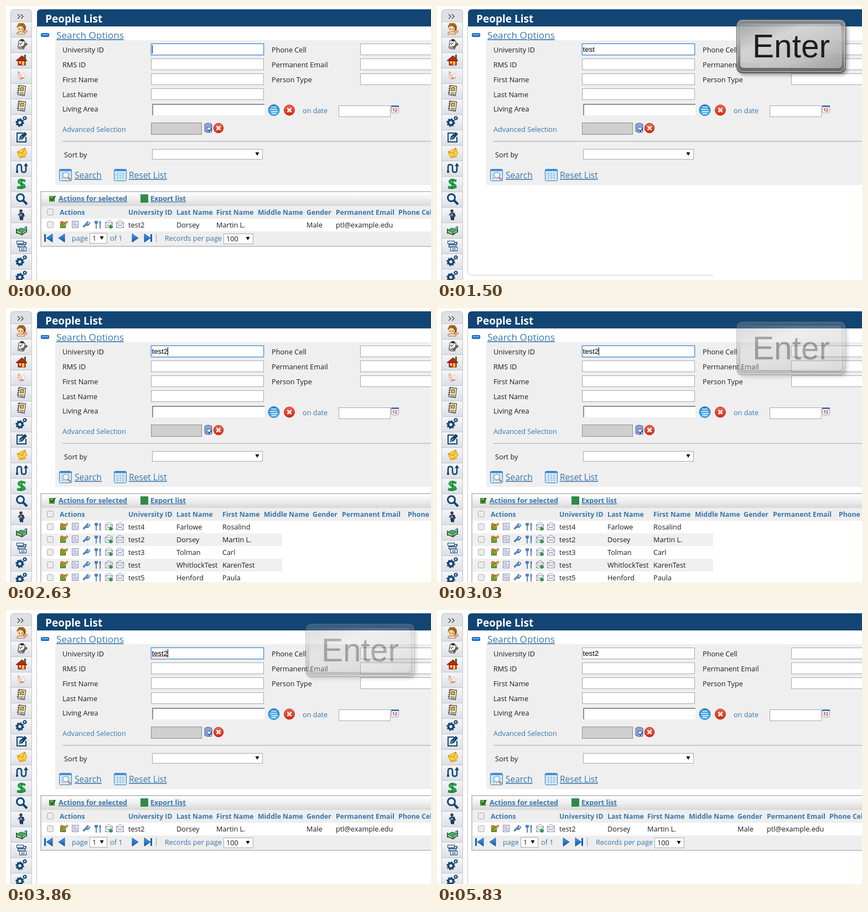
Recreate the animation shown at these times as an HTML page. Size 768x496 px, loop 5900 ms.

```html
<!DOCTYPE html>
<html lang="en">
<head>
<meta charset="utf-8">
<title>People List</title>
<style>
html, body { margin: 0; width: 100%; height: 100%; overflow: hidden; background: #fff; }
svg { display: block; width: 768px; height: 496px; }
text { font: 12.7px "Open Sans", "Noto Sans", sans-serif; fill: #1c1c1c; white-space: pre; }
.blue { fill: #3976ab; }
.bold { font-weight: 700; font-size: 12.3px; fill: #3976ab; }
.link { fill: #3976ab; text-decoration: underline; }
.tool { font-weight: 700; font-size: 12.6px; }
.big { font-size: 15.5px; }
.head { font-size: 17.2px; }
.title { font-weight: 700; font-size: 19px; fill: #fff; }
.date { font-weight: 700; font-size: 8px; fill: #d22; }
.typed { font: 13.33px "Liberation Sans", Arial, sans-serif; fill: #000; }
.cap { font: 58.6px "Liberation Sans", Arial, sans-serif; fill: #000; }
</style>
</head>
<body>
<svg id="stage" viewBox="0 0 768 496"></svg>
<script>
const LOOP = 5900, NAVY = '#124573';

const text = (x, y, s, cls = '') => `<text x="${x}" y="${y}" class="${cls}">${s}</text>`;
const box = (x, y, w, h, fill, stroke = 'none', rx = 0) => {
  const o = stroke === 'none' ? 0 : .5;
  return `<rect x="${x + o}" y="${y + o}" width="${w - 2 * o}" height="${h - 2 * o}" rx="${rx}" fill="${fill}" stroke="${stroke}"/>`;
};
const path = (d, fill = 'none', stroke = 'none', w = 1) =>
  `<path d="${d}" fill="${fill}" stroke="${stroke}" stroke-width="${w}"/>`;
const dot = (x, y, r, fill, more = '') => `<circle cx="${x}" cy="${y}" r="${r}" fill="${fill}" ${more}/>`;
const at = (x, y, s, turn = 0) => `<g transform="translate(${x} ${y}) rotate(${turn})">${s}</g>`;
const field = (x, y, w, h = 21) => box(x, y, w, h, '#fff', '#a9a9a9');
const arrow = (x, y) => path(`M${x - 3.5} ${y - 3}h7l-3.5 6z`, '#000');
const gradient = (id, stops, dir = 'x2="0" y2="1"') =>
  `<linearGradient id="${id}" ${dir}>${stops.map((c, i) =>
    `<stop offset="${i / (stops.length - 1)}" stop-color="${c}"/>`).join('')}</linearGradient>`;

const defs = `<defs>
  ${gradient('cell', ['#f6f6f8', '#e9ebee', '#dcdfe4'])}
  ${gradient('bar', ['#ffffff', '#eeeeee', '#d8d8d8'])}
  ${gradient('blueBall', ['#1f86d8', '#55b8f6'])}
  ${gradient('redBall', ['#f0664e', '#d22812'])}
  ${gradient('nav', ['#4a9ee4', '#0b55ab'])}
  ${gradient('edge', ['#8c8c8c', '#a8a8a8', '#868686', '#505050'])}
  ${gradient('face', ['#9a9a9a', '#d0d0d0', '#bebebe', '#959595'], 'x2="1" y2="1"')}
  <filter id="soft" x="-10%" y="-15%" width="125%" height="140%"><feGaussianBlur stdDeviation="3"/></filter>
</defs>`;

// Sidebar icons, each drawn around its centre
const gear = (x, y, r) =>
  dot(x, y, r, 'none', `stroke="${NAVY}" stroke-width="${r * .8}"`) +
  dot(x, y, r * 1.45, 'none', `stroke="${NAVY}" stroke-width="${r * .5}" stroke-dasharray="${r * 1.45 * Math.PI / 8}"`);
const gears = gear(-3, 1, 4.6) + gear(6, -7, 2.3);
const notes = at(0, -1, box(-6, -9, 13, 18, '#fffbe8', '#222') + box(-3, -6, 7, 7, '#e3b43c', '#54400f') +
  path('M-3 4h8M-3 6.500h8', 'none', '#333') + path('M-8 -7h4M-8 -3h4M-8 1h4M-8 5h4', 'none', '#333'), 8);
const icons = [
  dot(0, -3, 8, '#8b5a20') + dot(-2, 0, 6, '#fbd2a4') + path('M-9 -4q7 -1 9 -6q4 6 7 6l-3 -7h-9z', '#a66d25') +
    path('M-8 6q7 -3 14 0v3h-14z', '#f4e4d0', '#9b6a38') + dot(-4, 0, .9, '#333') + dot(1, 0, .9, '#333') + dot(8, 4, 3, '#e8a66a'),
  at(0, 0, box(-6, -8, 12, 16, '#fff', '#222', 2) + box(-3, -10, 6, 4, '#333') +
    path('M-4 -2l2 2 3 -4M-4 4l2 2 3 -4', 'none', '#222') + path('M1 5L8 -4l2 2-7 8z', '#b98b55', '#222'), 8),
  path('M-6 0h13v9h-13z', '#e23a22', '#5c1309') + path('M-10 1L1 -8 10 1z', '#c42412', '#5c1309') +
    path('M4 -4l1 -6h3v8z', '#2c7d2a') + box(1, 2, 4, 7, '#f2cb3c') + box(-4, 2, 3, 4, '#ffe99c'),
  path('M-6 -8q3 4 4 8t5 5l-6 2q-5 -6 -3 -15z', '#f7d9c6', '#e0a88c') + path('M2 -4q5 -2 4 4l-2 5h-4z', '#fff', '#dba') +
    path('M-2 5l7 -1', 'none', '#d55', 1.5) + dot(-4, -5, 1.2, '#dc8a62'),
  notes, notes, gears,
  path('M3 -8h-11v16h16v-9', 'none', NAVY, 2) + path('M-5 5l2 -7 9 -8 4 4 -8 9z', NAVY) + path('M-4 4l6 -6', 'none', '#fff'),
  path('M-8 -2L6 -9l4 10-13 7z', '#ffd53d', '#c78f10') + path('M-8 -2l10 3 4 -10', 'none', '#b87d0a') + path('M-8 0l5 8 11 -4v3l-11 3z', '#f0a818'),
  path('M-8 7V-3q0 -4 4 -4t4 4v6q0 4 4 4t4 -4V-4', 'none', NAVY, 2.6) + path('M4 -4h8l-4 -6z', NAVY) + dot(-8, 6, 2.2, NAVY),
  path('M7 -5q-8 -4 -11 -1t4 6 4 5-12 1', 'none', '#26a045', 4.5) + path('M1 -9L-1 9', 'none', '#147a2e', 2) + path('M-8 7q9 4 16 -2', 'none', '#147a2e', 1.5),
  dot(-2, -3, 6.5, '#eef4f9', `stroke="${NAVY}" stroke-width="3"`) + path('M3 2l7 7', 'none', NAVY, 4),
  dot(-1, -7, 2.8, '#3b3b44') + path('M-3 -4h6l1 7-2 6h-5l-1 -6z', '#1e4d91') + path('M-3 -3l-3 4M3 -3l2 6M-1 4v6M2 4v6', 'none', '#222', 1.6) + dot(-1, 0, 1.5, '#f1b984'),
  path('M-9 0l8 -4 9 3-7 6z', '#3fae55', '#17602a') + path('M-9 -3v9M1 4v5M9 -7v11M-9 4l10 4 8 -6', 'none', '#3b5c38', 2) + path('M3 -4l5 -4 1 6z', '#67a7de'),
  box(-9, -9, 13, 6, '#e8eef5', NAVY) + box(-7, -3, 14, 6, '#9fb9d3', NAVY) + box(-4, 2, 13, 8, '#f6f9fc', NAVY) + path('M-1 5h7M-1 7.500h7', 'none', NAVY) + path('M4 -6h4v4', 'none', NAVY, 1.6),
  gears, gears
];
const sidebar = path('M8.500 496V12q0 -5.500 6 -5.500h26q6 0 6 5.500V496z', '#dfe1e5', '#bdbdbd') +
  path('M21 15l4 4-4 4M27 15l4 4-4 4', 'none', '#444c56', 1.4) +
  icons.map((icon, i) => box(8, 28 + 28 * i, 39, 29, 'url(#cell)', '#c3c5c8') + at(28, 42 + 28 * i, icon)).join('');

const redCross = (x, y, r) => dot(x, y, r, 'url(#redBall)', 'stroke="#b9301c"') +
  at(x, y, path('M-3.500 -3.500l7 7M3.500 -3.500l-7 7', 'none', '#fff', 2.6));
const gridIcon = box(0, 0, 23, 22, '#dceefb', '#2f78b8', 2) + box(1, 1, 21, 3, '#3f92d8') +
  path('M2 8.500h19M2 12.500h19M2 16.500h19M6.500 5v15M11.500 5v15M16.500 5v15', 'none', '#8fbfe4');

const form = box(89, 62, 679, 262, '#efefef') +
  box(63, 49, 15, 7, '#2c83dc', '#0d4fa4', 1) + box(65, 51, 11, 1, '#8dc3f5') +
  text(91, 59, 'Search Options', 'link head') +
  ['University ID', 'RMS ID', 'First Name', 'Last Name', 'Living Area']
    .map((s, i) => text(102, [84, 111, 138, 165, 191][i], s)).join('') +
  text(102, 228, 'Advanced Selection', 'blue') + text(105, 274, 'Sort by') +
  ['Phone Cell', 'Permanent Email', 'Person Type']
    .map((s, i) => text(480, 84 + 27 * i, s) + field(640, 68 + 27 * i, 140)).join('') +
  [68, 95, 122, 149].map(y => field(262, y, 204)).join('') +
  box(264, 177, 203, 21, '#fff') + path('M265 198V178H467', 'none', '#8f8f8f', 2) +
  dot(484, 188.5, 10, 'url(#blueBall)', 'stroke="#1f76bd"') +
  path('M479 183h10M477 187h13M479 191h12M480 194.500h8', 'none', '#fff', 1.4) +
  redCross(512, 188.5, 9.5) + text(536, 194, 'on date', 'blue') + field(601, 180, 94) +
  box(696, 180, 14, 14, '#fff', '#8a97b8', 2) + box(696, 180, 14, 3, '#4d6db5') + text(698, 191, '12', 'date') +
  box(262, 211, 92, 22, '#cfcfcf', '#8c8c8c') +
  path('M359 214q6 -4 13 0v13q-6 4 -13 0z', '#8fa3cf', '#52679c') + box(363, 219, 9, 10, '#e8f0fc', '#3d5fa8') +
  path('M365 224l2.500 3 4 -6', 'none', '#2849a0', 2) + redCross(384, 221, 8.8) +
  box(102, 244, 666, 2, '#c8c8c8') + field(264, 259, 200, 19) + arrow(454, 268) +
  at(96, 295, gridIcon + dot(12, 11, 5, '#f4fafe', 'stroke="#a9b4c4" stroke-width="1.800"') + path('M16 15l5 5', 'none', '#d0704a', 2.4)) +
  at(195, 295, gridIcon) + text(124, 312, 'Search', 'link big') + text(222, 312, 'Reset List', 'link big');

// Result lists
const check = y => box(74, y, 12, 12, '#ececec', '#aaa', 2);
const envelope = x => box(x, -4, 14, 10, '#fdfdff', '#8b93ae') +
  path(`M${x} -4l7 -4 7 4M${x} 6l5 -5h4l5 5M${x} -3l7 5 7 -5`, 'none', '#8b93ae');
const actions = y => check(y - 6) + at(0, y,
  box(98, -5, 10, 11, '#5dac3a', '#2f7a1c') + dot(101, -4, 3, '#d9702b') + path('M102 3l8 -10 2 2-8 9z', '#f1b23a', '#8d5b12') +
  box(119, -7, 12, 13, '#f3f3fb', '#7b80ad') + path('M121 -3.500h6M121 -.500h8M121 2.500h8', 'none', '#7b80ad') +
  path('M139 3l5 -5 3 -4 5 3-3 4-7 1-1 3z', '#5f97d2', '#2d5c94') + dot(149, -3, 1.2, '#fff') +
  path('M163 -2v9M161 -7v4h4v-4M163 -7v4M170 -7v14', 'none', '#2b5fa3', 1.5) + path('M169 -7q4 3 1 7z', '#2b5fa3') +
  envelope(179) + path('M189.500 0v7M186 3.500h7', 'none', '#22962f', 2.6) + envelope(199));
const row = (y, cells, xs) => actions(y) + cells.map((s, i) => text(xs[i], y + 5, s)).join('');
const listTop = xs => box(62, 335, 720, 2, '#c6c6c6') + box(64, 337, 704, 25, 'url(#bar)') +
  box(64, 362, 704, 23, '#eeeeee') +
  box(78, 344, 10, 10, '#62b24a', '#35752b') + path('M80 348l3 4 6 -8', 'none', '#165f14', 2.2) +
  box(243, 341, 14, 15, '#2f8a46') +
  text(95, 353, 'Actions for selected', 'link tool') + text(261, 353, 'Export list', 'link tool') + check(367) +
  ['Actions', 'University ID', 'Last Name', 'First Name', 'Middle Name', 'Gender', 'Permanent Email', 'Phone Cell']
    .map((s, i) => text([97, 221, 308, ...xs][i], 378, s, 'bold')).join('');

const tri = (x, dir) => path(`M${x} 420l${dir * 11} -7.500v15z`, 'url(#nav)', '#0d4f9c', .8);
const pager = box(64, 408, 704, 26, '#eeeeee') + box(62, 434, 720, 2, '#c6c6c6') +
  box(69, 413, 3, 14, '#1260b5') + tri(73, 1) + tri(95, 1) + tri(239, -1) + tri(261, -1) + box(261, 413, 3, 14, '#1260b5') +
  text(119, 425, 'page', 'blue') + field(151, 411, 32, 19) + text(156, 425, '1') + arrow(173, 420) +
  text(188, 425, 'of 1', 'blue') + box(271, 412, 1, 16, '#8aa3ba') +
  text(287, 425, 'Records per page', 'blue') + field(393, 412, 54, 19) + text(398, 426, '100') + arrow(437, 421);

const oneXs = [380, 455, 543, 596, 709], manyXs = [391, 466, 554, 607, 726];
const people = [['test4', 'Farlowe', 'Rosalind'], ['test2', 'Dorsey', 'Martin L.'], ['test3', 'Tolman', 'Carl'],
  ['test', 'WhitlockTest', 'KarenTest'], ['test5', 'Henford', 'Paula']];
const oneList = listTop(oneXs) + box(62, 335, 2, 101, '#c6c6c6') +
  row(396, ['test2', 'Dorsey', 'Martin L.', 'Male', 'ptl@example.edu'], [221, 308, 380, 543, 596]) + pager;
const manyList = listTop(manyXs) + box(62, 335, 2, 161, '#c6c6c6') +
  people.map((p, i) => (i % 2 ? box(64, 408 + 23 * (i - 1), 435, 23, '#f0f0f0') : '') +
    row(396 + 23 * i, p, [221, 308, 391])).join('');

const keyCap = `<g opacity=".4" filter="url(#soft)">${box(545, 29, 197, 96, '#000', 'none', 11)}</g>` +
  box(541, 24, 198, 98, 'url(#edge)', '#5c5c5c', 10) + box(543, 26, 194, 93, 'none', '#c4c4c4', 9) +
  box(548, 32, 183, 80, 'url(#face)', '#b8b8b8', 5) + text(570, 93, 'Enter', 'cap');

const squiggle = path('M264 85' + 'l2 -2l2 2'.repeat(7), 'none', '#e02020');

// Spinner dots shrink behind the leading one
const sizes = [4, 3.6, 3.2, 2.8, 2.4, 2, 1.6, 2.6];
const spinner = sizes.map((r, i) => {
  const a = -i * Math.PI / 4;
  return dot(11.8 * Math.cos(a), 11.8 * Math.sin(a), r, NAVY);
}).join('');

document.getElementById('stage').innerHTML = defs + sidebar +
  `<g id="side">${path('M55.500 36V496', 'none', '#c9c9c9')}</g>
   <path id="corner" fill="none" stroke="#c9c9c9"/>` +
  path('M56 37V13q0 -7 7 -7H768V37z', NAVY) + text(71, 30, 'People List', 'title') + form +
  `<g id="focus">${box(261, 67, 206, 23, 'none', '#a9cbee', 1)}${box(262, 68, 204, 21, 'none', '#4b8fd8')}</g>
   <g id="spell">${squiggle}</g>
   <text id="typed" class="typed" x="263.500" y="83"></text>
   <rect id="caret" y="71" width="1" height="15"/>
   <g id="one">${oneList}</g><g id="many">${manyList}</g>
   <g id="spinner">${spinner}</g>
   <g id="key">${keyCap}</g>`;

const parts = Object.fromEntries(['side', 'corner', 'focus', 'spell', 'typed', 'caret', 'one', 'many', 'spinner', 'key']
  .map(id => [id, document.getElementById(id)]));

const within = (t, a, b) => t >= a && t < b;
const show = (id, on) => { parts[id].style.display = on ? '' : 'none'; };
const clamp = v => Math.max(0, Math.min(1, v));
const press = (t, start, fade, end) => t < start || t >= end ? 0 :
  Math.min(clamp((t - start + 45) / 130), clamp((fade + 430 - t) / 430));

const keystrokes = [300, 390, 470, 560, 2630];
function render(t) {
  const count = keystrokes.filter(k => t >= k).length;
  const lastStroke = count ? keystrokes[count - 1] : 0;
  parts.typed.textContent = 'test2'.slice(0, count);
  parts.caret.setAttribute('x', 264 + Math.floor(parts.typed.getComputedTextLength()));
  show('caret', t < 5800 && Math.floor((t - lastStroke) / 533) % 2 === 0);
  show('spell', within(t, 3690, 5800));
  show('focus', t < 5830);
  parts.focus.style.opacity = t < 5800 ? 1 : .5;

  const one = t < 1000 || t >= 3800;
  const many = within(t, 1610, 3090);
  const spinning = within(t, 1230, 1470) || within(t, 3300, 3720);
  const narrow = within(t, 1470, 1610) || within(t, 3720, 3800);
  show('one', one);
  show('many', many);
  show('side', one || many);
  show('corner', !one && !many);
  parts.corner.setAttribute('d', `M55.500 36V480q0 7.500 7 7.500H${narrow ? 499 : 768}`);
  show('spinner', spinning);
  const turn = (Math.floor((t - 3320) / 80) - 1) * 45;
  parts.spinner.setAttribute('transform', `translate(640.5 400.5) rotate(${turn})`);
  parts.key.style.opacity = Math.max(press(t, 960, 1450, 1860), press(t, 3030, 3570, 4000));
}

const begin = performance.now();
(function frame() {
  render((performance.now() - begin) % LOOP);
  requestAnimationFrame(frame);
})();
</script>
</body>
</html>
```
